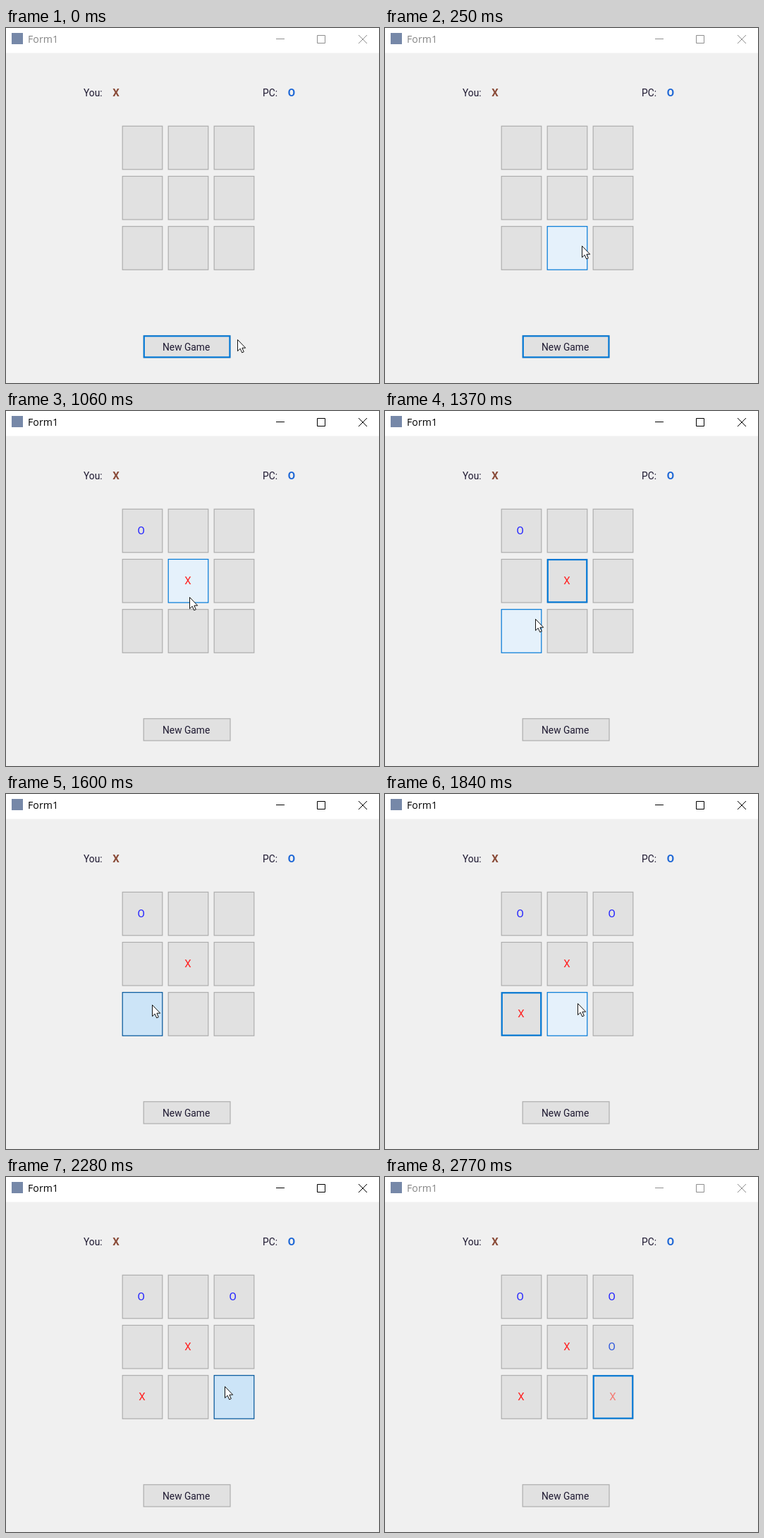
These frames come from a looping animation (529x504 px, 3230 ms). An HTML page:

```html
<!DOCTYPE html>
<html lang="en">
<head>
<meta charset="utf-8">
<title>Form1</title>
<style>
  html, body { margin: 0; width: 100%; height: 100%; overflow: hidden; background: #f0f0f0; }
  svg { display: block; width: 529px; height: 504px; }
  text { font: 13.8px Roboto, "Liberation Sans", sans-serif; fill: #1d1830; }
  .title { font: 14.2px "Open Sans", "Noto Sans", sans-serif; fill: #000; }
  .controls { fill: none; stroke: #000; }
  .idle .title { fill: #858585; }
  .idle .controls { stroke: #8f8f8f; }
  .mark { font-size: 15px; text-anchor: middle; }
  .key { font-size: 15px; font-weight: bold; text-anchor: middle; }
  .you { fill: #ff2222; }
  .pc { fill: #2222ff; }
  .button { fill: #e1e1e1; stroke: #adadad; stroke-width: 1.2; }
  .focus { fill: none; stroke: #0078d7; stroke-width: 2.1; visibility: hidden; }
  .focused .focus { visibility: visible; }
  .hover .button { fill: #e5f1fb; stroke: #0078d7; }
  .down .button { fill: #cce4f7; stroke: #005499; }
  .hover .focus, .down .focus { visibility: hidden; }
</style>
</head>
<body>
<svg id="form" viewBox="0 0 529 504">
  <rect width="529" height="504" fill="#f0f0f0"/>
  <rect width="529" height="35.5" fill="#fff"/>
  <rect x="8" y="7" width="16" height="16" fill="#7688a8"/>
  <text class="title" x="31" y="21">Form1</text>
  <path class="controls" d="M383 15.5H395M441.5 10.5H452.5V21.5H441.5ZM500 10L512 22M512 10L500 22"/>
  <text x="110" y="97">You:</text>
  <text class="key" x="156" y="97" style="fill:#8a4b38">X</text>
  <text x="364" y="97">PC:</text>
  <text class="key" x="405" y="97" style="fill:#1f68d6">O</text>
  <g id="board"></g>
  <path id="cursor" d="M.5 .5V16.7L4.2 13.2L6.7 18.9L9.3 17.8L6.9 12.2H11.7Z" fill="#fff" stroke="#111"/>
</svg>
<script>
const LOOP = 3230;
const STEP = 76; // the pointer is redrawn about 13 times a second
const NS = "http://www.w3.org/2000/svg";
const form = document.getElementById("form");
const board = document.getElementById("board");
const cursor = document.getElementById("cursor");

function add(parent, tag, attrs) {
  const el = document.createElementNS(NS, tag);
  for (const name in attrs) el.setAttribute(name, attrs[name]);
  return parent.appendChild(el);
}

function addButton(x, y, width, height) {
  const g = add(board, "g", {});
  add(g, "rect", { class: "button", x, y, width, height });
  add(g, "rect", { class: "focus", x: x + .6, y: y + .6, width: width - 1.2, height: height - 1.2 });
  return { g, x, y, width, height };
}

const buttons = [];
for (let i = 0; i < 9; i++) {
  buttons.push(addButton(165.2 + i % 3 * 65, 139.3 + Math.floor(i / 3) * 71.2, 56.6, 61.5));
}
const newGame = addButton(195.2, 436.8, 122.8, 31.2);
buttons.push(newGame);
add(board, "text", { x: 222, y: 457.5 }).textContent = "New Game";

function addMark(cell, letter, side, fill) {
  const { x, y } = buttons[cell];
  const dx = side === "you" ? 27.7 : 26.4;
  const el = add(board, "text", { class: "mark " + side, x: x + dx, y: y + 35.7 });
  el.textContent = letter;
  if (fill) el.style.fill = fill;
  return el;
}

const turns = [
  { press: 800, release: 830, you: 4, pc: 0 },
  { press: 1600, release: 1680, you: 6, pc: 2 },
  { press: 2220, release: 2300, you: 8, pc: 5, red: "#f47b74", blue: "#2f58dc" }
];
for (const turn of turns) {
  turn.marks = [addMark(turn.you, "X", "you", turn.red), addMark(turn.pc, "O", "pc", turn.blue)];
}

const moves = [
  { start: 0, end: 440, from: [328, 442], to: [262, 264] },
  { start: 1060, end: 1520, from: [260, 264], to: [207, 299] },
  { start: 1680, end: 2050, from: [207, 298], to: [310, 297] },
  { start: 2300, end: 2690, from: [310, 297], to: [444, 484] }
];

const easeOut = p => 1 - (1 - p) ** 2;

function pointer(t) {
  const { start, end, from, to } = moves.findLast(m => t >= m.start);
  const steps = Math.round((end - start) / STEP);
  const p = Math.min(1, Math.floor((t - start) / (end - start) * steps) / steps);
  return from.map((a, i) => Math.round(a + (to[i] - a) * easeOut(p)));
}

function draw(t) {
  const [px, py] = pointer(t);
  const visible = t < 2770;
  cursor.setAttribute("transform", `translate(${px} ${py})`);
  cursor.setAttribute("visibility", visible ? "visible" : "hidden");
  form.classList.toggle("idle", t < 800 || t >= 2690);

  const turn = turns.findLast(s => t >= s.press);
  const focused = turn ? buttons[turn.you] : newGame;
  const pressed = Boolean(turn) && t < turn.release;
  for (const b of buttons) {
    const over = visible && px >= b.x && px <= b.x + b.width && py >= b.y && py <= b.y + b.height;
    b.g.classList.toggle("focused", b === focused);
    b.g.classList.toggle("hover", over);
    b.g.classList.toggle("down", pressed && b === focused);
  }

  for (const { release, marks } of turns) {
    for (const el of marks) el.setAttribute("visibility", t >= release ? "visible" : "hidden");
  }
}

const begin = performance.now();
function tick() {
  draw((performance.now() - begin) % LOOP);
  requestAnimationFrame(tick);
}
tick();
</script>
</body>
</html>
```
